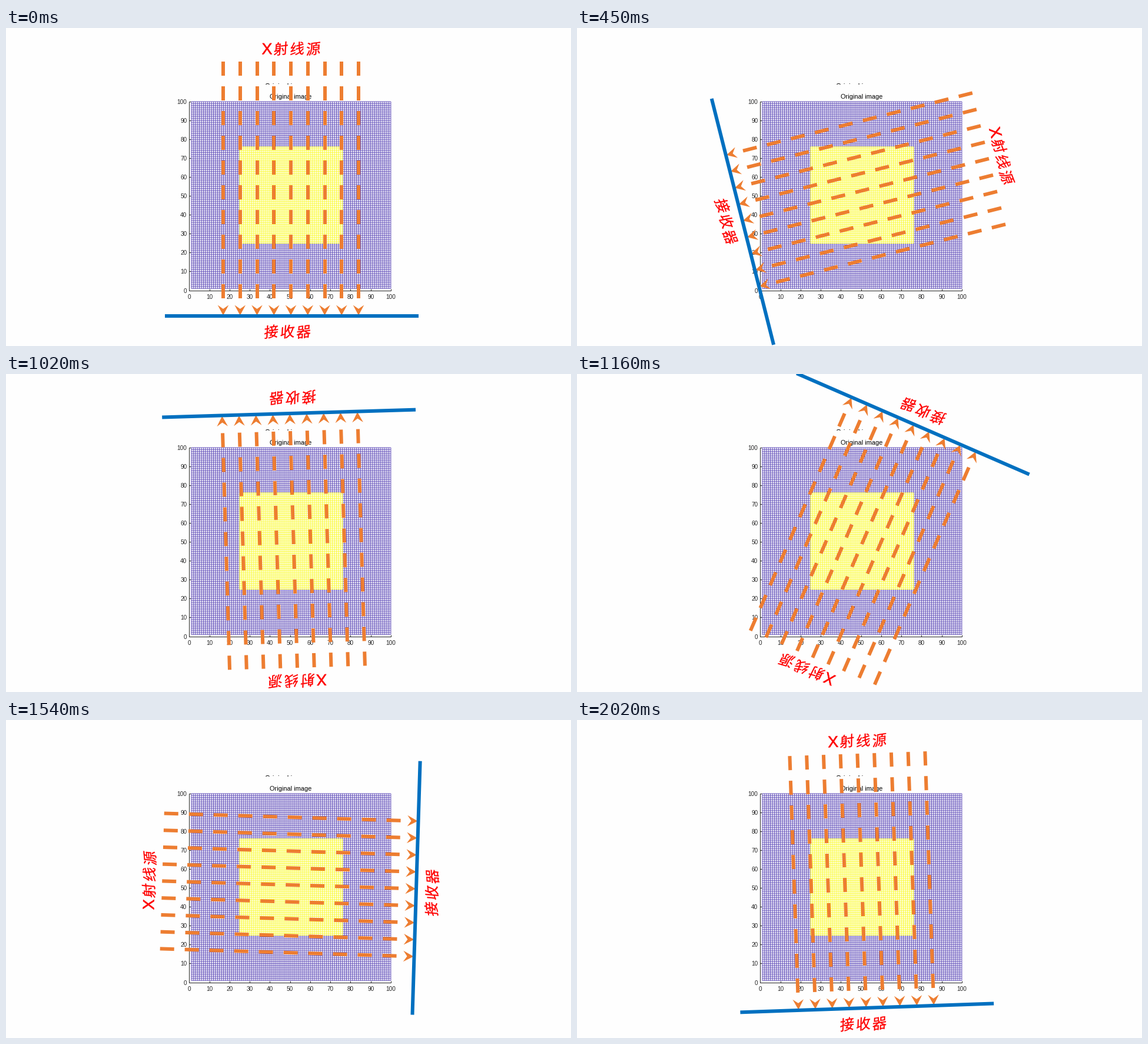
Recreate the animation shown at these times as a matplotlib script. Size 960 by 540 pixels, loop 2080 ms.

```python
import numpy as np
import matplotlib.pyplot as plt
from matplotlib.animation import FuncAnimation
from matplotlib.collections import LineCollection, PolyCollection
from matplotlib.patches import PathPatch, Rectangle
from matplotlib.textpath import TextPath
from matplotlib.transforms import Affine2D

W, H, DPI = 960, 540, 100
PX = 72 / DPI  # points per pixel
LOOP, TICK = 2080, 10
PAPER, INK = "#fefefe", "#262626"
PURPLE, YELLOW = "#5743b6", "#fbfc22"
ORANGE, BLUE, RED = "#ed7d31", "#0070c0", "#ff0000"
CENTER = (486.2, 278)
SPIN_START, SPIN_TIME = 28, 2003

fig = plt.figure(figsize=(W / DPI, H / DPI), dpi=DPI, facecolor=PAPER)
ax = fig.add_axes([0, 0, 1, 1])
ax.set_xlim(0, W)
ax.set_ylim(H, 0)
ax.axis("off")

spin = Affine2D()
spinning = spin + ax.transData


def px(v):
    return 311.4 + 3.425 * v


def py(v):
    return 445.5 - 3.205 * v


def segments(segs, color, width, z, transform=None, snap=None):
    lines = LineCollection(segs, colors=color, linewidths=width * PX,
                           capstyle="butt", zorder=z, snap=snap)
    lines.set_transform(transform or ax.transData)
    ax.add_collection(lines, autolim=False)


def words(x, y, s, size, color=INK, ha="center", z=3):
    ax.text(x, y, s, fontsize=size * PX, family="Liberation Sans",
            color=color, ha=ha, va="baseline", zorder=z)


def cover(x, y, w, h, z):
    ax.add_patch(Rectangle((x, y), w, h, fc=PAPER, ec="none", zorder=z))


def mesh(lo, hi, color, z):
    vals = np.arange(lo, hi + 1)
    segs = [[(px(v), py(lo)), (px(v), py(hi))] for v in vals]
    segs += [[(px(lo), py(v)), (px(hi), py(v))] for v in vals]
    segments(segs, color, 0.9, z, snap=False)


def glyph(char, font, size, place, weight):
    path = place.transform_path(TextPath((0, 0), char, size=size,
                                         prop={"family": font}))
    patch = PathPatch(path, fc=RED, ec=RED, lw=weight * PX, zorder=8)
    patch.set_transform(spinning)
    ax.add_patch(patch)


def brush(chars, x, y, size=24.5, step=27.5):
    """CJK label whose strokes rise slightly to the right."""
    for i, char in enumerate(chars):
        place = (Affine2D().translate(-size / 2, -0.38 * size)
                 .skew(0.06, 0.12).scale(1, -1)
                 .translate(x + step * (i + 0.5), y))
        glyph(char, "Noto Sans CJK JP", size, place, 0.3)


# Plot of the scanned object
cover(px(0), py(100), px(100) - px(0), py(0) - py(100), 1)
mesh(1, 100, PURPLE, 1.1)
cover(px(25), py(76), px(76) - px(25), py(25) - py(76), 1.2)
mesh(25, 76, YELLOW, 1.3)

axis = [[(px(0), py(0)), (px(0), py(100))], [(px(0), py(0)), (px(100), py(0))]]
for v in range(0, 101, 10):
    axis += [[(px(0), py(v)), (px(0) + 3, py(v))],
             [(px(v), py(0)), (px(v), py(0) - 3)]]
    words(307.5, py(v) + 4, str(v), 10, ha="right")
    words(px(v), 460, str(v), 10)
segments(axis, INK, 1, 2)

words(483.5, 119.5, "Original image", 11, "black")
words(440, 102.5, "Original image", 11.8, "black", "left", z=2)
cover(436, 96.2, 100, 11, 2.5)

# Rotating source, rays and receiver
rays = 369 + 28.75 * np.arange(9)
segments([[(x, y), (x, y + 24)] for x in rays for y in range(57, 436, 42)],
         ORANGE, 6, 5, spinning)
heads = PolyCollection(
    [[(x, 488), (x - 9.3, 470.5), (x, 477), (x + 9.3, 470.5)] for x in rays],
    facecolors=ORANGE, edgecolors="none", zorder=6)
heads.set_transform(spinning)
ax.add_collection(heads, autolim=False)
segments([[(270, 489), (701, 489)]], BLUE, 6, 7, spinning)

glyph("X", "Liberation Sans", 27,
      Affine2D().scale(1, -1).translate(434.5, 44.5), 0.6)
brush("射线源", 453.5, 35)
brush("接收器", 437, 515.5)

# Start time of each pose; the angle holds in between
poses = np.round(np.interp(
    np.arange(44),
    [0, 1, 5, 12, 13, 15, 22, 24, 25, 29, 36, 37, 43],
    [0, 40, 230, 540, 590, 690, 1020, 1110, 1160, 1350, 1680, 1730, 2020]), -1)


def update(i):
    t = poses[np.searchsorted(poses, i * TICK, side="right") - 1]
    angle = 360 * max(0, t - SPIN_START) / SPIN_TIME
    spin.clear().rotate_deg_around(*CENTER, angle)
    return []


anim = FuncAnimation(fig, update, frames=LOOP // TICK, interval=TICK,
                     repeat=True, repeat_delay=0, cache_frame_data=False)
plt.show()
```
